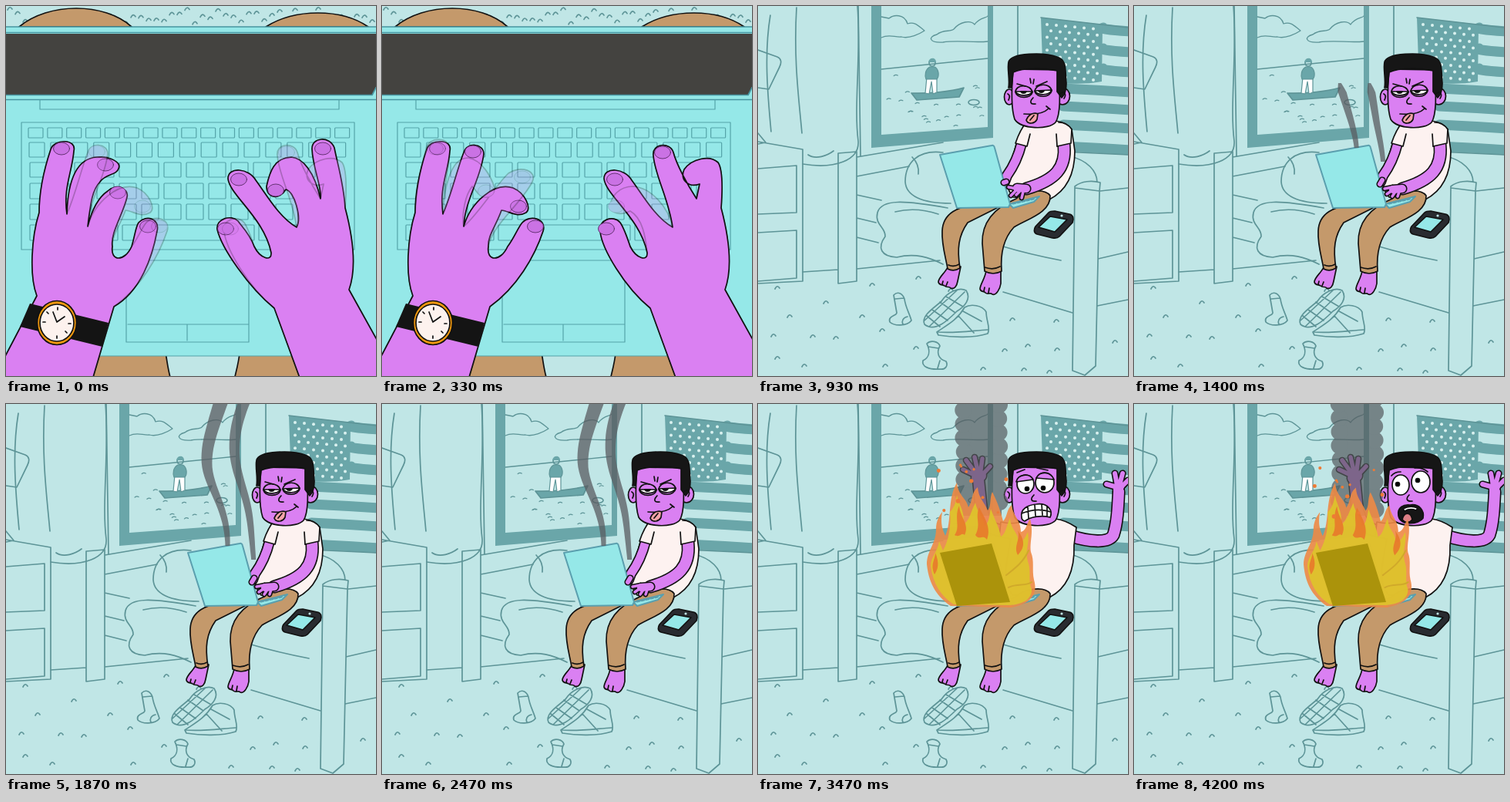
Animation, 480 px wide and 480 px high, one loop 4.27 s. Source, as an HTML page:

```html
<!DOCTYPE html>
<html lang="en">
<head>
<meta charset="utf-8">
<title>Hot laptop</title>
<style>
html,body{margin:0;width:100%;height:100%;overflow:hidden;background:#c0e6e6}
svg{display:block;width:100vw;height:100vh}
path,ellipse,circle,rect{stroke-linejoin:round;stroke-linecap:round}
.l{fill:none;stroke:#5d9497;stroke-width:1.7}
.k{fill:none;stroke:#55a4a9;stroke-width:1.2}
.b{stroke:#111;stroke-width:1.7}
.n{fill:none}
.skin{fill:#da80f2}.pants{fill:#c4996b}.shirt{fill:#fdf2f0}.teal{fill:#6aa6a9}.cyan{fill:#95e8e8}.white{fill:#fff}
</style>
</head>
<body>
<svg viewBox="0 0 480 480">
<g id="desk">
  <rect width="480" height="480" fill="#c0e6e6"/>
  <g id="rug" class="l"></g>
  <g class="pants b">
    <path d="M17 27C55-5 128-5 163 27ZM337 27C375 3 435 3 470 27Z"/>
    <path d="M-5 450H207C209 460 210 472 214 485H-5ZM303 450H485V485H296C299 472 302 462 303 450Z"/>
  </g>
  <path class="cyan" d="M0 27H480V454H0Z"/>
  <path d="M0 36H480V105L475 115H0Z" fill="#444340"/>
  <path d="M0 27H480M0 34.5H480M0 115.5H475L480 106M0 121.5H480" fill="none" stroke="#4795a0" stroke-width="1.7"/>
  <path class="k" d="M44 122V134H432V122M20 151H452V316H20ZM156 330H315V436H156ZM158 413H315M235 413V434M0 454H480"/>
  <g id="keys" class="k"></g>
  <g id="hands"></g>
  <g id="ghost" opacity=".24"></g>
  <path d="M31 386L133 411 125 442 18 416Z" fill="#141414"/>
  <ellipse class="b" cx="66" cy="411" rx="25.5" ry="28.5" fill="#f0980f"/>
  <ellipse class="b" cx="66" cy="411" rx="22" ry="24" fill="#fdf2ee"/>
  <path class="b n" d="M61 397L66 410 76 403M67 391V394M66 428V431M48 410H51M81 412H84M53 397L55 399M79 424L77 422"/>
</g>

<g id="room">
  <rect width="480" height="480" fill="#c0e6e6"/>
  <g class="l">
    <path d="M16 12C8 60 12 110 17 163M50 2C46 70 53 120 57 165M129 0C134 60 124 130 130 175C132 200 100 212 58 205M65 193C75 200 90 194 98 188"/>
    <path d="M0 57L25 66C30 68 31 73 28 79L14 108 0 106M0 165L10 177 0 179M0 176L58 186V357L0 360M0 211L50 207V268L0 270M0 294L50 291V353L0 357"/>
    <path d="M104 191L128 189V357L104 360ZM130 0L133 194M337 0V150M128 196L240 177M128 221L196 208M128 245L160 252M128 275L153 281M128 300L156 307M58 345L104 342M128 341L236 330"/>
    <path d="M240 190C208 186 191 203 191 228C192 246 212 256 250 256M200 196C206 202 209 210 208 218M246 262C190 252 160 250 155 268C151 284 166 287 165 299C154 314 160 325 180 326C204 320 222 326 240 335M178 267C198 262 216 264 234 270"/>
    <path d="M405 195C427 200 440 214 440 229M318 312C345 320 372 326 393 330M318 371L408 398M444 240L480 236M441 328L480 319M440 389L480 381"/>
    <path fill="#c0e6e6" d="M411 234C420 227 433 226 444 229L443 240 438 467 424 479 408 473ZM411 236L443 240"/>
  </g>
  <path class="teal" d="M147 0H160V167L298 157V0H305V171L147 184Z"/>
  <path class="l" style="stroke-width:1.3" d="M160 82L298 68M160 41C170 36 178 41 186 40C196 43 210 36 216 32C208 26 204 20 194 23C190 10 176 11 170 16L160 14M298 46C280 48 260 44 240 47C222 48 220 40 232 37C240 30 250 34 254 30C262 20 276 18 281 24C288 14 296 16 298 13"/>
  <g id="waves" class="l" style="stroke-width:1.2"></g>
  <path class="l" style="fill:#6aa6a9" d="M199 113C220 114 250 111 267 106L261 118 206 122Z"/>
  <path class="l white" style="stroke-width:1.2" d="M219 92L217 113 222 114 225 98 227 114 232 112 232 92Z"/>
  <path class="l teal" style="stroke-width:1.2" d="M223 79C217 82 216 90 218 95L232 95C236 90 234 81 229 79Z"/>
  <circle class="l" cx="226" cy="74" r="4"/><path class="teal" d="M221 73C222 66 231 66 231 73Z"/>
  <ellipse class="l" cx="280" cy="125" rx="7" ry="3.5"/>
  <g id="flag"></g>
  <g class="l">
    <path d="M176 375C182 369 188 374 190 380C191 390 197 400 199 408C193 416 176 415 171 410C168 402 180 402 180 398ZM178 380L189 379M194 403C188 404 186 409 188 413"/>
    <path d="M219 438C224 433 234 435 236 441C231 450 234 458 244 461C247 467 243 472 236 471C222 472 212 468 214 460C222 456 224 448 219 438ZM221 442L234 444M236 460L233 470"/>
    <path d="M216 413C211 402 228 392 238 383C245 372 260 364 270 369C277 380 268 390 258 396C247 407 230 424 216 413ZM219 402L236 416M226 394L246 408M236 384L256 398M244 377L266 390M222 416L268 371M216 408L258 369"/>
    <path d="M232 423C245 414 258 408 268 391C276 386 291 388 296 397C296 408 302 418 298 425C280 431 252 430 234 427ZM260 402L280 424M266 396L290 409M234 423C255 425 280 421 298 420"/>
  </g>
  <g id="marks" class="l"></g>

  <path id="torsoCalm" class="shirt b" d="M349 150C340 160 336 175 334 183L327 207C322 220 320 235 331 248L378 251C403 238 411 214 411 188L407 160C402 152 394 150 386 149Z"/>
  <g id="armsUp"></g>
  <path id="torsoPanic" class="shirt b" d="M349 150C338 155 326 156 315 153L313 172 328 175C322 205 316 235 331 248L378 251C403 238 411 214 410 183L413 160C404 154 394 150 386 149Z"/>

  <g class="b">
    <path class="skin" d="M246 339C243 346 234 352 234 358C235 363 240 361 242 363C245 366 248 363 250 366C255 368 258 363 259 357L263 338ZM296 343C295 353 288 361 288 367C289 372 293 369 295 372C298 375 302 371 304 374C309 376 314 367 315 360L315 343ZM240 357L239 361M246 358L244 363M294 365L293 370M300 366L299 372"/>
    <path class="pants" d="M300 250C270 260 240 262 239 292C238 310 244 328 246 341Q254 345 262 340C258 315 260 298 272 281L310 262Z"/>
    <path class="pants" d="M335 250C306 262 290 280 291 308L294 344Q305 350 316 344C314 318 320 300 332 287C350 276 380 268 379 246C372 236 345 239 335 250Z"/>
    <path class="n" d="M247 336Q254 339 261 335M294 339Q305 343 314 338"/>
    <path d="M360 286L377 268C379 266 382 266 385 266L404 270C409 271 410 276 408 281L391 299C388 302 385 301 382 301L362 296C357 294 358 289 360 286Z" fill="#292b30"/>
    <path class="cyan" d="M364 287L379 273 401 277 385 293Z"/>
    <circle cx="394" cy="272" r="1.6" fill="#c0e6e6" stroke="none"/>
  </g>

  <g id="calm">
    <g id="armsDown"></g>
    <path class="shirt b" d="M388 182L406 178 407 160C402 153 396 151 390 151"/>
    <path class="shirt b" d="M349 150C340 160 336 172 334 178L349 182 353 166"/>
    <path class="b n" d="M388 182L387 166"/>
  </g>

  <g class="b">
    <ellipse class="skin" cx="326" cy="118" rx="6.5" ry="10"/>
    <ellipse class="skin" cx="395" cy="117" rx="9.5" ry="11"/>
    <path class="skin" d="M331 82C329 105 328 132 333 147C341 160 377 161 386 151C392 142 393 116 389 83Z"/>
    <path d="M325 106C327 95 323 82 325 73C328 60 372 60 388 66C402 70 398 86 400 100C400 109 398 115 394 119L388 111 388 84C370 80 345 80 331 86L329 106Z" fill="#161616"/>
    <path class="n" d="M392 114C396 109 401 114 397 120M324 114Q328 116 325 122"/>
  </g>
  <g id="smug" class="b">
    <path class="skin" d="M334 112C334 101 354 101 356 112C354 120 337 121 334 112ZM359 111C360 100 379 99 381 110C379 119 362 120 359 111Z"/>
    <path class="white" d="M334 111L356 111C353 117 338 118 334 111ZM359 110L381 109C378 116 363 117 359 110Z"/>
    <path d="M341 111A4 4 0 0 0 348 111ZM364 110A4 4 0 0 0 371 110Z"/>
    <path class="n" d="M336 101L347 104M361 104L375 98M353 94L354 100M358 95L357 101M357 119C352 124 353 128 360 127M345 140C356 141 370 140 377 133M374 130L379 134"/>
    <path d="M363 140C357 137 350 142 348 148C350 154 359 153 362 147Z" fill="#f5a3a8"/><path class="n" d="M358 142L353 148"/>
  </g>
  <g id="grit" class="b">
    <ellipse class="white" cx="347" cy="104" rx="11" ry="12"/><ellipse class="white" cx="372" cy="102" rx="12" ry="13"/>
    <path class="skin" d="M335 101C337 91 352 89 357 98ZM361 96C366 86 380 88 384 98Z"/>
    <circle cx="349" cy="110" r="2.5"/><circle cx="370" cy="109" r="2.5"/>
    <path class="n" d="M336 89L346 85M362 83L376 86M358 118C353 123 354 127 361 126"/>
    <path class="white" d="M342 147C340 136 350 131 361 130C376 128 383 138 379 147C368 144 354 146 346 152C343 151 342 149 342 147ZM342 142C354 137 368 136 380 140M350 133L351 148M359 131L360 145M368 130L369 144M375 133L375 145"/>
  </g>
  <g id="scream" class="b">
    <ellipse class="white" cx="346" cy="105" rx="11" ry="13"/><ellipse class="white" cx="372" cy="101" rx="12" ry="14"/>
    <circle cx="342" cy="104" r="2.5"/><circle cx="368" cy="99" r="2.5"/>
    <path class="n" d="M334 93Q338 88 346 88M364 83Q374 82 381 88M357 118C352 123 354 127 361 126"/>
    <path d="M343 145C341 134 350 130 358 131C370 129 377 138 375 148C370 156 346 159 343 145Z" fill="#161616"/>
    <path d="M348 150C350 140 359 139 361 150C358 154 352 155 348 150Z" fill="#dd7f86"/>
    <path class="white" d="M349 136Q358 131 368 135L366 138Q358 135 351 139Z"/>
  </g>

  <g id="laptop" fill="#95e8e8" stroke="#5a9fae" stroke-width="2">
    <path d="M326 257L365 247 358 254 331 262Z"/>
    <path d="M331 256L358 250" stroke-width="3" stroke-dasharray="3 3"/>
    <path d="M236 193L303 181Q306 180 307 184L327 257 325 261 258 262Z"/>
  </g>
  <g id="typing"></g>
  <g id="wisps" fill="#595b60" opacity=".74"></g>
  <g id="column" fill="#565b5f" opacity=".7"></g>
  <g id="sparks" fill="#f0832b"></g>
  <g id="fire">
    <path d="M250 262C234 251 222 236 219 208C219 190 231 182 231 162C231 152 235 145 239 140C236 156 240 164 243 171C252 152 245 124 258 102C260 120 270 121 273 134C279 126 276 115 285 108C286 122 293 126 298 138C303 133 300 122 304 114C311 128 315 140 318 152C324 146 322 137 329 131C331 146 341 150 341 166C349 164 348 155 353 149C358 168 352 178 354 192C359 204 355 215 358 228C364 248 352 260 328 264Z" fill="#ef8a45" opacity=".9"/>
    <path d="M254 260C238 250 227 234 224 210C224 198 233 192 235 178L240 190C247 178 251 158 249 140C255 134 257 126 258 118C261 132 268 138 267 156C275 150 276 140 282 128C284 140 292 146 294 158C300 154 300 144 302 136C307 150 313 160 315 172C322 168 322 158 327 148C328 164 338 166 338 180C345 178 347 172 350 166C353 180 346 190 350 204C355 217 350 230 355 240C356 254 342 260 326 261Z" fill="#dfc32c" opacity=".94"/>
    <path d="M255 170C263 160 254 147 261 132C262 147 275 156 268 170C264 166 262 174 255 170ZM282 170C290 156 281 147 287 134C294 148 303 160 297 176C292 168 288 178 282 170ZM229 221C223 208 230 202 230 193C236 207 233 215 229 221ZM337 196C331 184 341 176 337 164C347 177 346 187 337 196Z" fill="#e8792c" opacity=".9"/>
    <path d="M322 222C332 214 344 206 351 190M325 238C337 232 347 237 355 231" fill="none" stroke="#d0a92a" stroke-width="2"/>
  </g>
  <path id="char" d="M236 193L303 181 327 257 258 262Z" fill="#ab930b"/>
  <g id="embers" fill="#ee7b36"></g>
</g>
</svg>
<script>
const $ = id => document.getElementById(id);
const path = (d, attrs = '') => `<path d="${d}" ${attrs}/>`;
const rnd = n => { const v = Math.sin(n * 127.1) * 43758.5; return v - Math.floor(v); };
const range = (n, f) => Array.from({length: n}, (_, i) => f(i)).join('');
const show = (ids, on) => ids.split(' ').forEach(id => { $(id).style.display = on ? '' : 'none'; });
const dot = (x, y, r) => `<circle cx="${x}" cy="${y}" r="${r}"/>`;
const SKIN = '#da80f2';

// Round limbs whose overlaps share one outline
function limbs(list) {
  const pass = (color, extra) => list.map(([d, w]) =>
    path(d, `fill="none" stroke="${color}" stroke-width="${w + extra}"`)).join('');
  return pass('#111', 3.2) + pass(SKIN, 0);
}

// Keyboard: top, height, first x, pitch, key width, count
const rows = [[158, 13, 29, 24.85, 19, 17], [177, 19, 30, 27.9, 20, 15], [203, 19, 31, 29, 22, 14],
  [230, 20, 31, 29, 22, 14], [257, 20, 31, 29, 22, 14]];
$('keys').innerHTML = rows.map(([y, h, x, step, w, n]) =>
  range(n, i => `<rect x="${x + i * step}" y="${y}" width="${w}" height="${h}" rx="1"/>`)).join('') +
  [[31, 22], [60, 22], [89, 25], [120, 25], [151, 140], [297, 25], [328, 25], [359, 22], [388, 22], [417, 28]]
    .map(([x, w]) => `<rect x="${x}" y="284" width="${w}" height="20" rx="1"/>`).join('');

const tuft = (x, y) => path(`M${x - 3} ${y + 2}Q${x} ${y - 4} ${x + 3} ${y + 1}`);
$('rug').innerHTML = range(48, i => tuft(5 + i * 10, 3 + rnd(i) * 20));
$('marks').innerHTML = [[88, 384], [41, 402], [20, 427], [25, 456], [71, 428], [101, 430], [135, 402], [161, 420],
  [165, 466], [60, 466], [208, 352], [250, 368], [205, 443], [330, 406], [320, 446], [350, 440], [387, 408],
  [388, 445], [463, 435], [345, 471], [292, 470], [378, 474], [25, 365], [148, 361]].map(p => tuft(...p)).join('');
$('waves').innerHTML = range(34, i => {
  const x = 164 + rnd(i + 3) * 126, y = 88 + rnd(i + 70) * 68;
  return x > 195 && x < 270 && y < 126 ? '' : path(`M${x} ${y}q2.5 -2 5 -.5`);
});

$('flag').innerHTML = [30, 57, 83, 109, 132, 156, 184].map(y =>
  path(`M${y < 100 ? 448 : 396} ${y - 2}Q440 ${y} 482 ${y + 3}`, 'fill="none" stroke="#6aa6a9" stroke-width="13"')).join('') +
  path('M367 15L447 24 446 98C420 103 400 99 370 101Z', 'class="teal"') +
  path('M367 15L480 28M395 189L480 193', 'class="l"') +
  '<g fill="#d9f1ef">' + range(54, i => {
    const r = Math.floor(i / 6), c = i % 6;
    return dot(375 + c * 12 + (r % 2) * 5, 24 + r * 8.3 + c * 1.1, 2);
  }) + '</g>';

// Finger outlines with nail centres; each runs from one joint to the next
const left = {
  start: 'M-5 462L40 376C30 350 33 300 43 268', web: 'C135 332 154 332 163 312', end: 'L112 485H-5Z',
  fingers: [
    {A: ['C43 240 50 210 58 186C62 172 92 172 88 188C86 215 74 235 79 270', 72, 185],
     B: ['C45 230 52 205 57 186C60 168 90 169 88 188C87 215 78 240 79 270', 69, 185]},
    {A: ['C80 235 88 198 118 196C136 195 150 203 146 211C143 220 130 217 122 228C110 240 109 265 106 286', 129, 206],
     B: ['C80 240 88 196 112 197C130 200 142 222 146 236C146 250 130 252 122 240L117 234C108 245 103 270 106 286', 135, 240],
     C: ['C90 245 98 210 106 190C110 176 132 178 132 192C128 225 108 250 106 286', 118, 189]},
    {A: ['C112 262 120 248 132 240C142 230 160 236 157 248C152 270 135 295 138 312', 145, 242],
     B: ['C125 270 148 232 164 217C180 206 202 214 195 228C182 255 142 285 138 312', 182, 222],
     C: ['C115 255 145 228 170 236C186 243 194 262 187 268C175 275 165 266 155 265C148 285 137 298 138 312', 177, 260]},
    {A: ['C168 295 168 287 172 281C182 270 200 276 196 292C190 325 175 370 140 390', 184, 286],
     B: ['C172 300 176 288 182 281C192 270 214 276 209 292C198 325 175 365 140 390', 199, 286]}]
};
const right = {
  start: 'M485 440L445 368C455 340 450 300 440 262', web: 'C345 332 330 328 322 312', end: 'L382 485H485Z',
  fingers: [
    {A: ['C438 230 430 205 426 184C420 168 396 170 397 186C398 210 410 235 408 250', 411, 185],
     B: ['C442 235 442 212 436 203C425 193 402 198 392 212C386 226 398 236 412 231L408 250']},
    {A: ['C400 215 385 197 370 196C348 197 342 215 338 234C338 250 355 252 363 238C374 240 384 275 377 287', 350, 239],
     B: ['C395 230 382 205 378 190C374 176 350 178 352 194C354 220 372 250 377 287', 364, 190]},
    {A: ['C355 275 338 245 324 226C315 210 288 208 288 224C290 245 335 275 344 320', 302, 225],
     B: ['C372 262 350 236 326 234C306 234 298 248 296 258C296 270 310 272 322 266C338 275 342 300 344 320', 304, 260]},
    {A: ['C316 295 305 285 301 279C292 270 272 276 274 290C280 315 315 365 348 392', 285, 289],
     B: ['C318 300 314 288 309 281C300 270 280 278 283 292C285 315 315 365 348 392', 291, 289]}]
};
function hand(h, pose) {
  const f = h.fingers.map((set, i) => set[pose[i]]);
  const d = h.start + f[0][0] + f[1][0] + f[2][0] + h.web + f[3][0] + h.end;
  return path(d, 'class="skin b"') + f.map(([, x, y]) => x ?
    `<ellipse cx="${x}" cy="${y}" rx="10.5" ry="8" fill="#ca72e4" stroke="#4b2357" stroke-width=".8"/>` : '').join('');
}
const poses = [['AAAA', 'AAAA'], ['BBBB', 'BBBB'], ['ACCB', 'BBAB']].map(([l, r]) => hand(left, l) + hand(right, r));

$('armsDown').innerHTML = limbs([['M342 178Q336 202 323 220L320 228', 11], ['M397 180C400 210 386 226 348 237', 14]]);
$('armsUp').innerHTML =
  limbs([['M342 164C305 168 296 160 290 138L286 98', 14], ['M285 94L266 85M284 92L270 73M286 91L281 69M288 92L291 71M289 94L301 81', 5.5], ['M284 96L289 93', 14]]) +
  limbs([['M405 171C430 179 455 181 461 170C466 155 467 135 468 114', 14], ['M466 108L452 104M466 106L463 90M469 105L473 90M471 108L480 99', 6], ['M467 111L469 107', 12]]);

// Wisp of smoke: base y, bend y, rest x, base x, top x, half width at top
const ease = u => (1 - Math.cos(Math.PI * Math.max(0, Math.min(1, u)))) / 2;
function wisp(base, bend, mid, low, high, half, top, k) {
  const a = [], b = [];
  for (let y = base; y >= top; y -= 6) {
    const x = mid + (low - mid) * ease((y - bend) / (base - bend)) + (high - mid) * (y < bend ? ((bend - y) / bend) ** 2 : 0)
      + 1.5 * Math.sin(y / 18 + k * .7);
    const tip = top > 0 ? Math.min(1, (y - top + 2) / 16) : 1;
    const w = (3 + (half - 3) * (1 - y / base)) * tip;
    a.push((x - w).toFixed(1) + ' ' + y);
    b.unshift((x + w).toFixed(1) + ' ' + y);
  }
  return a.length ? path('M' + a.concat(b).join('L') + 'Z') : '';
}
function column(k) {
  const drift = (k * 4) % 18;
  return '<rect x="263" y="-5" width="53" height="150"/>' + range(10, i =>
    dot(265 + 3 * rnd(i), 144 - i * 18 - drift, 11) + dot(314 - 2 * rnd(i + 9), 137 - i * 18 - drift, 11));
}
function sparks(k) {
  const j = k % 3;
  return dot(240, 238 - j, 3) + dot(242, 244, 2.6) + dot(335, 225 - j, 2.6) + dot(342, 224 + j, 2.4) + dot(338, 231, 2) +
    path('M247 259Q245 251 250 253L254 248 259 260ZM325 258L328 247 334 249 337 239 342 246 347 240 348 253Z');
}

const LOOP = 64;
function draw(k) {
  const close = k < 13;
  show('desk', close);
  show('room', !close);
  if (close) {
    const p = Math.floor(k / 2.5) % 3;
    $('hands').innerHTML = poses[p];
    $('ghost').innerHTML = k % 5 ? '' : poses[(p + 2) % 3];
    return;
  }
  const scared = k >= 48, grow = Math.min(1, Math.max(0, (k - 45) / 6));
  show('calm torsoCalm smug typing', !scared);
  show('torsoPanic armsUp column char embers', scared);
  show('grit', scared && k < 57);
  show('scream', k >= 57);
  const s = Math.floor(k / 2) % 2 ? 2 : 0;
  $('typing').innerHTML = limbs([[`M322 ${226 + s}L319 ${231 - s}`, 6], [`M348 237L336 ${238 - s}`, 10],
    [`M335 ${235 + s}L325 ${237 - s}M335 239L328 ${244 + s}M339 241L335 ${247 - s}M344 241L342 ${247 + s}`, 3.5]]);

  const top = Math.max(-6, 190 - (k - 17) * 23.3);
  show('wisps', !scared && k >= 17);
  $('wisps').innerHTML = wisp(184, 75, 262, 289, 277, 9.5, top, k) + wisp(202, 45, 297, 322, 307, 8, top, k);
  $('column').innerHTML = column(k);
  show('sparks', k >= 43 && k < 48);
  $('sparks').innerHTML = sparks(k);

  show('fire', grow > 0);
  const sway = k < 51 ? 0 : 1.2 * Math.sin((k - 52) * 2.1);
  const tall = grow * (1 + (grow === 1 ? .02 * Math.sin((k - 52) * 1.7) : 0));
  $('fire').setAttribute('transform', `translate(290 263) skewX(${sway}) scale(${.85 + .15 * grow} ${tall}) translate(-290 -263)`);
  $('embers').innerHTML = range(11, i => {
    const rise = (rnd(i + 5) * 70 + k * 5) % 75;
    return dot(232 + rnd(i + 21) * 96, 150 - rise, 1.3 + rnd(i) * 1.5);
  });
}

let last = -1;
const t0 = performance.now();
function tick() {
  const k = Math.floor(((performance.now() - t0) % 4270 + 4) * .015) % LOOP;
  if (k !== last) draw(last = k);
  requestAnimationFrame(tick);
}
tick();
</script>
</body>
</html>
```
